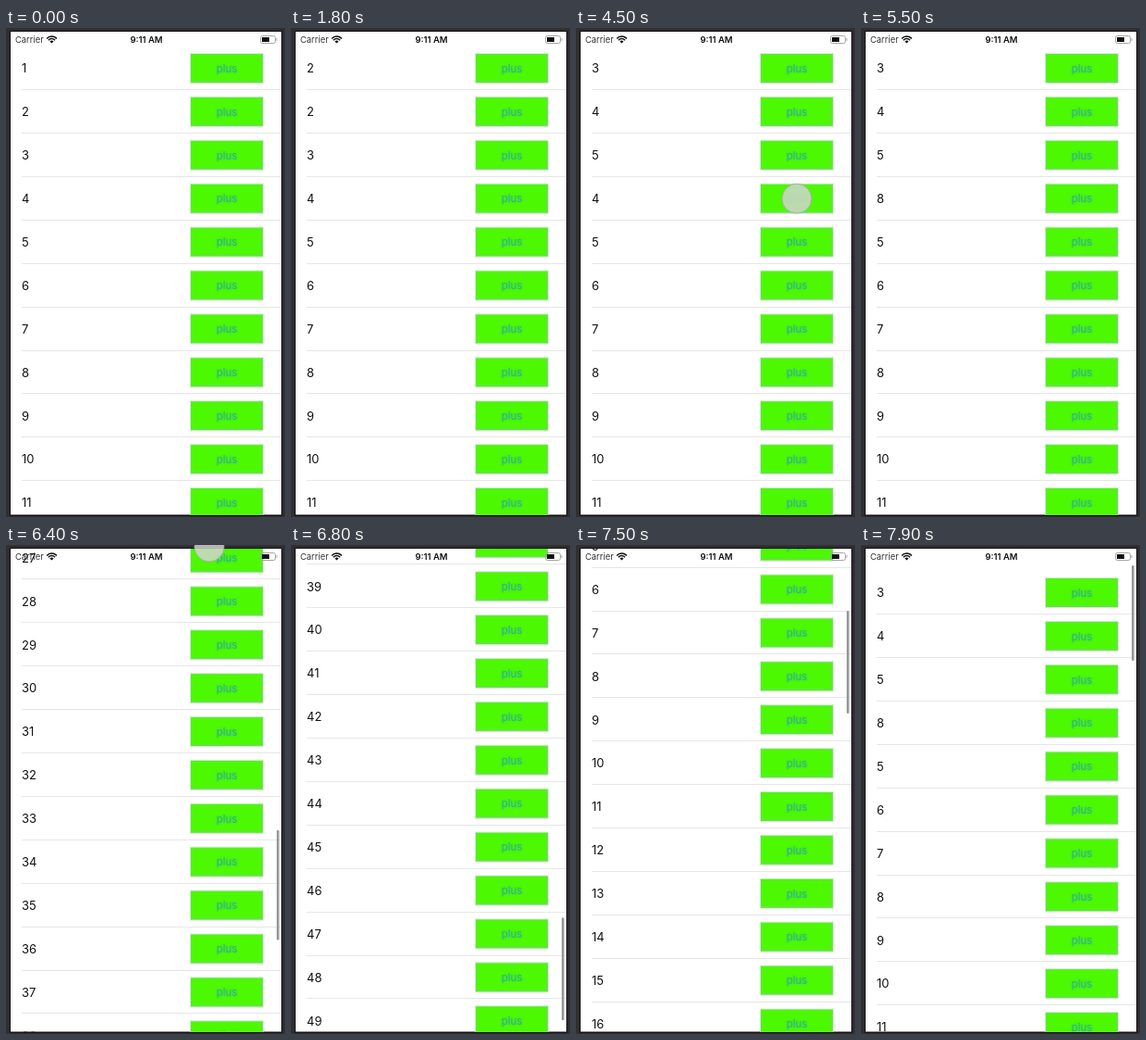
Recreate the animation shown at these times as an HTML page with a canvas. Size 302x528 px, loop 8 s.

```html
<!DOCTYPE html>
<html lang="en">
<head>
<meta charset="utf-8">
<title>Counter list</title>
<style>
html, body { margin: 0; width: 100%; height: 100%; overflow: hidden; background: #302e30; }
canvas { display: block; width: 302px; height: 528px; }
</style>
</head>
<body>
<canvas id="stage"></canvas>
<script>
const W = 302, H = 528, LOOP = 8000, STEP = 100;
const ROW = 46.9, FIRST = 43.5, ROWS = 50;
const FONT = 'Inter, Roboto, "Liberation Sans", sans-serif';

const canvas = document.getElementById('stage');
const ctx = canvas.getContext('2d');
const dpr = window.devicePixelRatio || 1;
canvas.width = W * dpr;
canvas.height = H * dpr;
ctx.scale(dpr, dpr);

// Taps: time, row, vertical offset from the row centre
const TAPS = [
  [1500, 0, 10], [2000, 0, -8], [2500, 1, 0], [2900, 1, 0],
  [3600, 2, 0], [4000, 2, 0],
  [4500, 3, 0], [4700, 3, 0], [5000, 3, 0], [5200, 3, 0]
];
const PRESS = 200;

// Scroll offset every 100 ms from 5800 on
const SCROLL_START = 5800;
const SCROLL = [0, 20, 190, 430, 650, 880, 1249, 1440, 1590, 1700, 1781,
  1700, 1450, 1210, 928, 640, 420, 230, 80, -30, -22, -8];

// Drags: start, end, x, y at release
const DRAGS = [
  [5900, 6050, 220, 80], [6250, 6400, 220, 2],
  [6900, 7020, 170, 480], [7080, 7200, 170, 525]
];

function scrollAt(t) {
  const p = Math.max(0, Math.min(SCROLL.length - 1, (t - SCROLL_START) / 100));
  const i = Math.min(SCROLL.length - 2, Math.floor(p));
  return SCROLL[i] + (SCROLL[i + 1] - SCROLL[i]) * (p - i);
}

function rect(x, y, w, h, color) {
  ctx.fillStyle = color;
  ctx.fillRect(x, y, w, h);
}

function text(str, x, y, size, color, align = 'left', weight = 400) {
  ctx.font = `${weight} ${size}px ${FONT}`;
  ctx.textAlign = align;
  ctx.fillStyle = color;
  ctx.fillText(str, x, y);
}

function button(cy, pressed) {
  const x = 200, y = cy - 15.5, w = 78, h = 31;
  rect(x - 1, y - 1, w + 2, h + 2, '#c9f7bd');
  rect(x, y, w, h, '#66e04a');
  rect(x + 1, y + 1, w - 3, h - 3, '#4df900');
  ctx.save();
  ctx.globalAlpha = pressed ? 0.25 : 1;
  ctx.shadowColor = '#3fc56a';
  ctx.shadowBlur = 3 * dpr;
  text('plus', 239, cy + 4.2, 11.5, '#2fb38c', 'center');
  ctx.restore();
}

function row(i, cy, t) {
  const taps = TAPS.filter(tap => tap[1] === i);
  const count = taps.filter(tap => t >= tap[0] + PRESS).length;
  const pressed = taps.some(tap => t >= tap[0] && t < tap[0] + PRESS);
  text(String(i + 1 + count), 17, cy + 4.8, 13, '#111');
  button(cy, pressed);
  rect(17, Math.round(cy + 22.6), 281, 1, '#e6e6e6');
}

function wifi(x, y) {
  ctx.strokeStyle = '#111';
  ctx.lineWidth = 1.5;
  for (const r of [7.4, 4.9]) {
    ctx.beginPath();
    ctx.arc(x, y, r, -Math.PI * 0.76, -Math.PI * 0.24);
    ctx.stroke();
  }
  ctx.fillStyle = '#111';
  ctx.beginPath();
  ctx.moveTo(x, y);
  ctx.arc(x, y, 2.9, -Math.PI * 0.76, -Math.PI * 0.24);
  ctx.fill();
}

function statusBar() {
  text('Carrier', 10, 16, 9.4, '#333');
  wifi(49.5, 16.5);
  text('9:11 AM', 152, 16, 9.5, '#111', 'center', 600);
  ctx.strokeStyle = '#a5a5a5';
  ctx.lineWidth = 1;
  ctx.beginPath();
  ctx.roundRect(275.5, 8.5, 16, 8, 2);
  ctx.stroke();
  rect(277, 10, 8, 5, '#111');
  rect(292.5, 11, 1, 3, '#a5a5a5');
}

function scrollBar(t, s) {
  if (t < 5900) return;
  // The bar runs slightly ahead during the fastest flick
  const lead = Math.exp(-(((t - 6400) / 50) ** 2));
  const top = 22 + Math.max(0, s) * 0.2135 + 19 * lead;
  const len = 111 + Math.min(0, s) + 8 * lead;
  ctx.fillStyle = '#979797';
  ctx.beginPath();
  ctx.roundRect(293, top, 2.6, len, 1.3);
  ctx.fill();
}

function finger(x, y) {
  ctx.beginPath();
  ctx.arc(x, y, 16, 0, Math.PI * 2);
  ctx.fillStyle = 'rgba(212,212,212,.82)';
  ctx.fill();
  ctx.strokeStyle = 'rgba(165,165,165,.8)';
  ctx.lineWidth = 1;
  ctx.stroke();
}

function touches(t, s) {
  for (const [t0, i, dy] of TAPS) {
    if (t >= t0 && t < t0 + PRESS) finger(239, FIRST + i * ROW + dy);
  }
  for (const [t0, t1, x, y] of DRAGS) {
    if (t >= t0 && t <= t1) finger(x, y + scrollAt(t1) - s);
  }
}

function draw(t) {
  const s = scrollAt(t);
  rect(0, 0, W, H, '#302e30');
  rect(4, 3, 295, 524, '#151315');
  ctx.save();
  ctx.beginPath();
  ctx.rect(5, 4, 293, 521.5);
  ctx.clip();
  rect(5, 4, 293, 522, '#fff');
  for (let i = 0; i < ROWS; i++) {
    const cy = FIRST + i * ROW - s;
    if (cy > -25 && cy < H + 25) row(i, cy, t);
  }
  statusBar();
  scrollBar(t, s);
  ctx.restore();
  touches(t, s);
}

const start = performance.now();
function tick() {
  const t = (performance.now() - start) % LOOP;
  draw(Math.floor(t / STEP) * STEP);
  requestAnimationFrame(tick);
}
tick();
</script>
</body>
</html>
```
